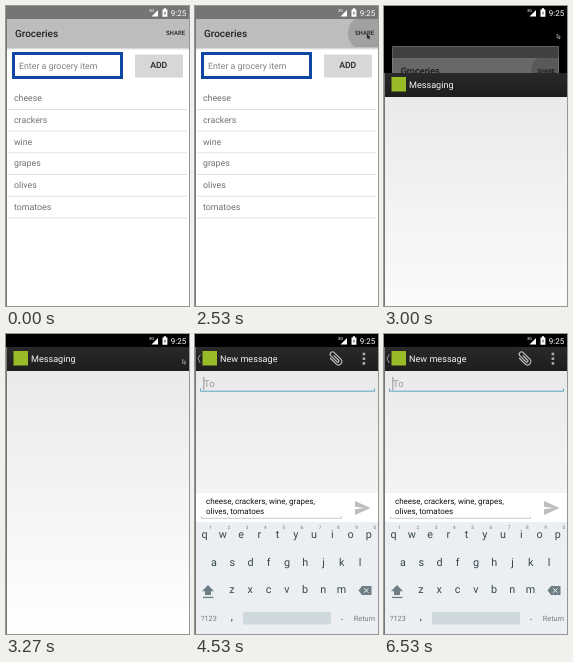
Write an HTML page that moves like this. It is 183 by 300 pixels and loops after 6590 ms.

```html
<!DOCTYPE html>
<html lang="en">
<head>
<meta charset="utf-8">
<title>Grocery list sharing</title>
<style>
  html, body { margin: 0; width: 100%; height: 100%; overflow: hidden; background: #000; }
  svg { display: block; width: 100vw; height: 100vh; font-family: Roboto, sans-serif;
    text-rendering: geometricPrecision; }
</style>
</head>
<body>
<svg id="stage" viewBox="0 0 183 300"></svg>
<script>
const LOOP = 6590;
const STEPS = [0, 530, 1000, 1270, 1530, 2000, 2530, 2730, 3000, 3270, 3530, 3730,
  4000, 4530, 5000, 5530, 6000, 6530];

const rect = (x, y, w, h, fill, extra = '') =>
  `<rect x="${x}" y="${y}" width="${w}" height="${h}" fill="${fill}" ${extra}/>`;
const path = (d, fill, extra = '') => `<path d="${d}" fill="${fill}" ${extra}/>`;
const line = (d, color, width = 1) => path(d, 'none', `stroke="${color}" stroke-width="${width}"`);
const text = (x, y, size, fill, content, extra = '') =>
  `<text x="${x}" y="${y}" font-size="${size}" fill="${fill}" ${extra}>${content}</text>`;
const group = (content, attrs) => `<g ${attrs}>${content}</g>`;
const middle = 'text-anchor="middle"';
const medium = 'font-weight="500"';

const defs = `<defs>
  <linearGradient id="page" x2="0" y2="1"><stop stop-color="#e8e8e8"/><stop offset="1" stop-color="#fff"/></linearGradient>
  <linearGradient id="bar" x2="0" y2="1"><stop stop-color="#292929"/><stop offset="1" stop-color="#1d1d1d"/></linearGradient>
  <linearGradient id="shade" x2="0" y2="1"><stop stop-color="#000" stop-opacity=".3"/><stop offset="1" stop-opacity="0"/></linearGradient>
  <clipPath id="toolbar"><rect y="13" width="183" height="28"/></clipPath>
</defs>`;

const statusBar = fill => rect(0, 0, 183, 13, fill)
  + text(143, 6.3, 4.2, '#fff', '3G')
  + path('M145.5 10.5L152 4V10.5Z', '#fff')
  + path('M156.5 3.5H157.9V2.3H160V3.5H161.4V10.8H156.5Z', '#fff')
  + path('M159.5 4.8L157.7 7.5H158.8L158.4 9.6L160.3 6.8H159.1Z', '#666')
  + text(164.8, 10, 8, '#fff', '9:25');

const leftEdge = rect(0, 13, 1, 287, '#777');

const pointer = (x, y, fill, stroke, opacity = 1) =>
  path(`M${x} ${y}V${y + 4.2}L${x + 1.1} ${y + 3.3}L${x + 2} ${y + 5}L${x + 2.8} ${y + 4.6}L${x + 2} ${y + 3}H${x + 3.4}Z`,
    fill, `stroke="${stroke}" stroke-width=".5" opacity="${opacity}"`);

function groceries({ caret, ripple }) {
  const items = ['cheese', 'crackers', 'wine', 'grapes', 'olives', 'tomatoes'];
  return rect(0, 0, 183, 300, '#fff')
    + rect(0, 0, 183, 13, '#757575')
    + rect(0, 13, 183, 28, '#bdbdbd')
    + rect(0, 41, 183, 3, 'url(#shade)')
    + (ripple ? '<circle cx="171" cy="27" r="18" fill="#000" opacity=".15" clip-path="url(#toolbar)"/>' : '')
    + text(9, 31, 10, '#222', 'Groceries', medium)
    + text(160, 29.3, 6, '#222', 'SHARE', medium)
    + rect(7.5, 47.5, 108, 24, '#fff', 'stroke="#0d47a1" stroke-width="3"')
    + text(13, 63, 8.8, '#808080', 'Enter a grocery item')
    + (caret ? rect(13.3, 53, 1, 13, '#444') : '')
    + rect(129, 49, 48, 22.5, '#bbb', 'rx="1" opacity=".6"')
    + rect(129, 48.5, 47.5, 21.5, '#d6d7d7', 'rx="1"')
    + text(152.7, 62, 8.7, '#222', 'ADD', middle + ' ' + medium)
    + items.map((item, i) => text(8, 95 + i * 21.8, 8.8, '#707070', item)
      + rect(2, 103 + i * 21.7, 179, .8, '#d9d9d9')).join('');
}

// The list, dimmed and shrunk, while the next screen opens.
const receding = (x, y, scale, dim) =>
  group(groceries({ ripple: true }) + rect(0, 0, 183, 300, '#000', `opacity="${dim}"`),
    `transform="translate(${x} ${y}) scale(${scale})"`);

const appBar = title => rect(0, 13, 183, 24, 'url(#bar)')
  + rect(7.5, 17, 14.5, 14.5, '#99bb28')
  + text(25, 28.3, 9.1, '#f3f3f3', title);

const messaging = rect(0, 13, 183, 287, 'url(#page)') + appBar('Messaging');

const compose = rect(0, 159, 183, 32, '#fff')
  + text(11, 170, 8, '#111', 'cheese, crackers, wine, grapes,')
  + text(11, 180, 8, '#111', 'olives, tomatoes')
  + line('M6.5 182.5V184.3H146.5V182.5', '#bbb', .8)
  + path('M160 167L175.5 174L160 181V175.3L170 174L160 172.7Z', '#bdbdbd');

function keyboard() {
  const ink = '#37474f', gray = '#6f7d84';
  const row = (letters, x, y) => [...letters].map((c, i) =>
    text(x + i * 18.25, y, 10.8, ink, c, middle)).join('');
  const digits = [...'1234567890'].map((c, i) => text(15.5 + i * 18.25, 194.7, 4.8, gray, c, middle)).join('');
  return rect(0, 188, 183, 112, '#eceff1') + digits
    + row('qwertyuiop', 9.5, 204) + row('asdfghjkl', 19, 231.5) + row('zxcvbnm', 37, 259)
    + path('M13 251L19 257.3H16V261H10V257.3H7Z', gray) + rect(8, 262.8, 10.5, 1.3, gray)
    + path('M163.5 256.5L167 252H176.5V261H167Z', gray)
    + line('M169 254.3L173.5 258.7M173.5 254.3L169 258.7', '#eceff1')
    + text(6, 286.5, 7.3, gray, '?123') + text(36.8, 286, 11, ink, ',', middle)
    + rect(48, 278, 88, 12.5, '#cfd8dc', 'rx="1.5"')
    + text(147, 286, 11, ink, '.', middle) + text(158.8, 286.5, 7.3, gray, 'Return');
}

const newMessage = (caret, keys) => rect(0, 13, 183, 287, 'url(#page)')
  + appBar('New message')
  + line('M5.3 20.5L3 24.7L5.3 29', '#aaa', .9)
  + group(line('M-2.6 -3.5V3A2.6 2.6 0 0 0 2.6 3V-4.2A1.8 1.8 0 0 0 -1 -4.2V2.4A.8 .8 0 0 0 .8 2.4V-3', '#c4c4c4', .9),
    'transform="translate(140.7 24.8) rotate(-45) scale(1.3)"')
  + [18.7, 23.4, 28.1].map(y => rect(167.6, y, 2.6, 2.6, '#aaa')).join('')
  + text(9, 53, 9.5, '#999', 'To')
  + (caret ? rect(8.4, 43, .9, 13, '#888') : '')
  + line('M5.5 54.5V57.2H179.5V54.5', '#5ba3c4', 1)
  + (keys ? compose + group(keyboard(), `opacity="${keys}"`)
    : group(compose, 'transform="translate(0 109)"'));

function scene(t) {
  if (t < 2730) {
    const caret = t % 1000 >= 530 && t < 2000;
    const cursor = t >= 1000 ? pointer(172, 28.3, '#111', '#555', t < 1270 ? .6 : 1) : '';
    return groceries({ caret, ripple: t >= 2530 }) + statusBar('#757575') + leftEdge + cursor;
  }
  const black = rect(0, 0, 183, 300, '#000');
  if (t < 3000) {
    return black + receding(6, 11.8, .935, .4) + statusBar('#000') + pointer(172, 28, '#111', '#ddd');
  }
  if (t < 3270) {
    return black + receding(8.5, 40.3, .907, .45)
      + group(messaging + leftEdge, 'transform="translate(0 54)"')
      + statusBar('#000') + pointer(173, 28, '#111', '#ddd');
  }
  if (t < 3530) return messaging + leftEdge + statusBar('#000') + pointer(176.5, 25.3, '#111', '#ddd');
  if (t < 3730) {
    return messaging + group(newMessage(true, 0), 'opacity=".6"') + leftEdge + statusBar('#000');
  }
  const caret = t < 4000 || t % 1000 >= 530;
  return newMessage(caret, t < 4000 ? .5 : 1) + leftEdge + statusBar('#000');
}

const stage = document.getElementById('stage');
let shown = -1;
function tick() {
  const now = performance.now() % LOOP;
  const step = STEPS.findLast(start => start <= now);
  if (step !== shown) stage.innerHTML = defs + scene(shown = step);
  requestAnimationFrame(tick);
}
tick();
</script>
</body>
</html>
```
